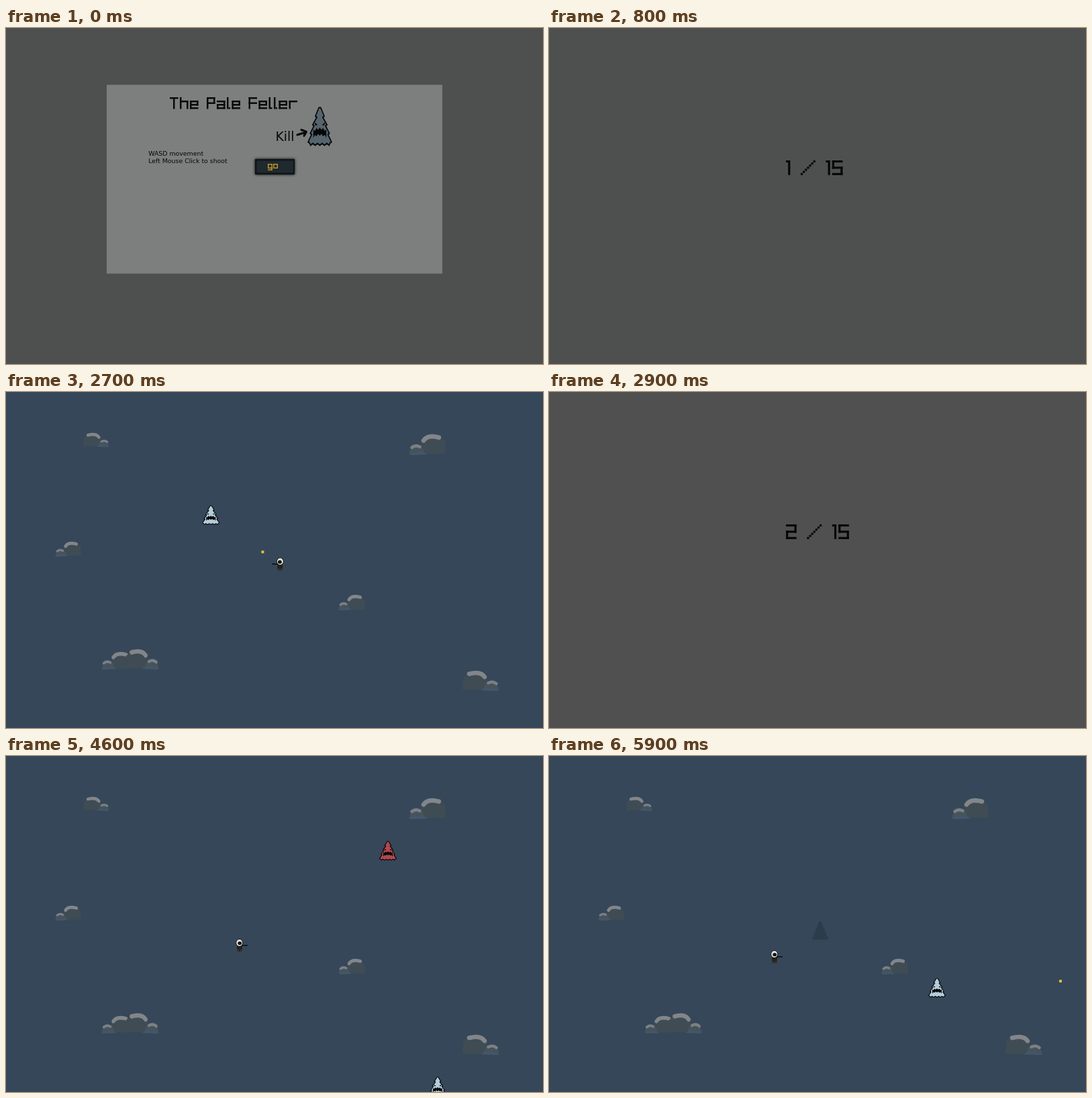
These frames come from a looping animation (800x500 px, 6 s). An HTML page with a canvas:

```html
<!DOCTYPE html>
<html lang="en">
<head>
<meta charset="utf-8">
<title>The Pale Feller</title>
<style>
html, body { margin: 0; width: 100%; height: 100%; overflow: hidden; background: #4d504f; }
canvas { display: block; }
</style>
</head>
<body>
<canvas id="stage" width="800" height="500"></canvas>
<script>
const ctx = document.getElementById('stage').getContext('2d');
const LOOP = 6000, TICK = 100;

function rect(x, y, w, h, color) {
  ctx.fillStyle = color;
  ctx.fillRect(x, y, w, h);
}

function disc(x, y, rx, ry, color) {
  ctx.fillStyle = color;
  ctx.beginPath();
  ctx.ellipse(x, y, rx, ry, 0, 0, Math.PI * 2);
  ctx.fill();
}

function shape(points, color) {
  ctx.beginPath();
  points.forEach(([x, y]) => ctx.lineTo(x, y));
  ctx.closePath();
  ctx.fillStyle = color;
  ctx.fill();
}

function brush(color, width) {
  ctx.strokeStyle = color;
  ctx.lineWidth = width;
  ctx.lineCap = ctx.lineJoin = 'round';
}

function label(text, x, y, size) {
  ctx.font = size + 'px "DejaVu Sans", sans-serif';
  ctx.fillStyle = '#080808';
  ctx.fillText(text, x, y);
}

// Pixel lettering: letters are built from named bars on a 5 by 7 grid.
const row = y => [0, y, 5, 1];
const col = (x, top, bottom) => [x, top, 1, bottom - top + 1];
const BARS = {
  a: row(0), x: row(2), m: row(3), c: row(4), b: row(6), d: row(8),
  L: col(0, 0, 6), l: col(0, 2, 6), u: col(0, 0, 3), k: col(0, 3, 6), n: col(0, 4, 6),
  r: col(4, 2, 6), v: col(4, 2, 4), w: col(4, 0, 3), z: col(4, 3, 6), q: col(4, 2, 8),
  s: col(2, 0, 6), p: col(1, 0, 6), i: col(0, 0, 0), f: col(1, 6, 6)
};
const LETTERS = {
  T: 'as', h: 'Lxr', e: 'xlbvc', P: 'aLwm', a: 'xrcnb', l: 'Lf', F: 'aLm', r: 'lx',
  g: 'xlbqd', o: 'xlbr', 1: 'ip', 2: 'awmkb', 5: 'aumzb'
};

function barsOf(ch) {
  if (ch === ' ') return [[0, 0, 3, 0]];
  if (ch === '/') return Array.from({ length: 7 }, (_, i) => [i, 6 - i, 1, 1]);
  return [...LETTERS[ch]].map(name => BARS[name]);
}

function pixelText(text, x, y, px, color) {
  for (const ch of text) {
    const bars = barsOf(ch);
    for (const [bx, by, w, h] of bars) rect(x + bx * px, y + by * px, w * px, h * px, color);
    x += (Math.max(...bars.map(b => b[0] + b[2])) + 1) * px;
  }
}

// Position along keys [time, x, y].
function along(keys, t) {
  let i = 0;
  while (i < keys.length - 2 && t >= keys[i + 1][0]) i++;
  const [t0, x0, y0] = keys[i], [t1, x1, y1] = keys[i + 1];
  const k = Math.max(0, Math.min(1, (t - t0) / (t1 - t0)));
  return [x0 + (x1 - x0) * k, y0 + (y1 - y0) * k];
}

// Tree outline in a 26 by 28 box: four widening tiers over a ragged hem.
function treeOutline() {
  const half = [[1, 0]];
  for (let i = 1; i <= 4; i++) {
    const x = 12.6 * (i / 4) ** .7, y = i * 6.4;
    half.push([x, y], [x - 1.6, y + .7]);
  }
  for (let i = 0; i <= 4; i++) half.push([10 - 2.5 * i, i % 2 ? 26.6 : 28]);
  return half.concat(half.slice().reverse().map(([x, y]) => [-x, y]));
}

// One row of teeth, bent down at the corners.
function teeth(y, bite) {
  return Array.from({ length: 9 }, (_, i) => {
    const x = (i - 4) * 1.75;
    return [x, y + (i % 2) * bite + .03 * x * x];
  });
}

const TREE = treeOutline();
const MOUTH = teeth(14.8, 1.6).concat(teeth(21, -1.6).reverse());

function monster(x, y, color, w = 26, h = 28) {
  ctx.save();
  ctx.translate(x, y - h / 2);
  ctx.scale(w / 26, h / 28);
  shape(TREE, color);
  brush('#050708', 1.1);
  ctx.stroke();
  shape(MOUTH, '#050708');
  for (const s of [-1, 1]) shape([[s * 6, 10.6], [s * 2.4, 12.8], [s * 4.6, 13.4]], '#050708');
  ctx.restore();
}

function corpse(x, y) {
  ctx.save();
  ctx.translate(x, y - 14);
  shape(TREE, '#2d3c4b');
  ctx.restore();
}

function snow(x0, y0, cx, cy, x1, y1, width, color) {
  brush(color, width);
  ctx.beginPath();
  ctx.moveTo(x0, y0);
  ctx.quadraticCurveTo(cx, cy, x1, y1);
  ctx.stroke();
}

function rock(x, y, w, h, flip) {
  ctx.save();
  ctx.translate(flip ? x + w : x, y);
  ctx.scale((flip ? -w : w) / 55, h / 30);
  shape([[0, 28], [1, 10], [8, 4], [29, 4], [37, 12], [38, 28]], '#3f4c54');
  shape([[31, 28], [34, 19], [39, 16], [49, 16], [54, 25], [54, 29]], '#47535b');
  shape([[27, 29], [34, 25], [46, 26], [55, 28], [52, 30]], '#43576b');
  snow(10, 4.5, 27, 0, 33, 9, 6.5, '#82868a');
  snow(38.5, 18, 45, 14.5, 50.5, 19, 4.5, '#7a8085');
  ctx.restore();
}

function field() {
  rect(0, 0, 800, 500, '#364759');
  rock(115, 61, 39, 21);
  rock(600, 63, 55, 31, true);
  rock(73, 223, 39, 22, true);
  rock(495, 302, 40, 23, true);
  rock(142, 387, 45, 26, true);
  rock(178, 383, 50, 30);
  rock(680, 415, 55, 30);
}

// dir: 0 = back view, 1 or -1 = aiming to that side
function player(x, y, dir) {
  ctx.save();
  ctx.translate(x, y);
  if (dir) {
    ctx.scale(dir, 1);
    rect(-4, 1, 8, 8, '#25231f');
    for (const leg of [-4, 1]) rect(leg, 6, 3, 3.5, '#3a362e');
    rect(2, -1, 10, 1.6, '#101010');
    disc(-.3, -4, 5.2, 5.8, '#0b0b0b');
    disc(-.3, -4, 4.5, 5, '#e4e4e0');
    disc(.2, -3.4, 2.9, 2.7, '#171513');
  } else {
    rect(-5.5, 0, 11, 9, '#171613');
    for (const side of [-4, .8]) {
      rect(side, 2, 3.4, 3, '#39352d');
      rect(side, 6, 3.4, 2.5, '#39352d');
    }
    disc(0, -2.8, 6, 5.7, '#141311');
    disc(0, -3, 5.4, 5, '#e2e2de');
    disc(0, -1.6, 4.5, 4.6, '#403831');
  }
  ctx.restore();
}

function bullet([x, y]) {
  rect(x - 2, y - 2, 4, 4, '#d9bd38');
}

// The hero hits the first foe once per period; each bullet takes FLIGHT ms.
const PERIOD = 350, FLIGHT = 200;
const WAVES = [
  {
    start: 1800, dies: 2900, dir: -1,
    hero: [[1800, 391, 241], [2800, 410, 258]],
    foes: [[[1800, 104, 49], [2900, 350, 213]]]
  },
  {
    start: 3900, dies: 5300, dir: 1,
    hero: [[3900, 391, 241], [4600, 348, 282], [5200, 283, 292], [5900, 336, 299]],
    foes: [
      [[3900, 746, 27], [4600, 569, 141], [5300, 404, 260]],
      [[3900, 706, 453], [4600, 643, 492], [5200, 640, 363], [5900, 578, 345]]
    ],
    stray: [[5400, 312, 296], [5900, 762, 335]]
  }
];

function wave({ start, dies, dir, hero, foes, stray }, t) {
  const age = t - start, phase = age % PERIOD;
  const [prey, ...others] = foes;
  const spot = along(prey, t), self = along(hero, t);
  field();
  if (t >= dies) corpse(...spot);
  else monster(...spot, age >= PERIOD && phase < TICK ? '#b3474e' : '#b4cddb');
  for (const path of others) monster(...along(path, t), '#b4cddb');

  const left = PERIOD - phase;
  if (t < dies && left < FLIGHT) {
    bullet(along([[0, ...self], [FLIGHT, ...spot]], FLIGHT - left));
  }
  if (stray && t >= stray[0][0]) bullet(along(stray, t));
  player(...self, age < FLIGHT ? 0 : dir);
}

function button(hover) {
  ctx.save();
  ctx.shadowColor = '#000';
  ctx.shadowBlur = 4;
  rect(371, 195, 59, 23, '#101416');
  ctx.restore();
  rect(373.5, 197.5, 54.5, 18, hover ? '#34434d' : '#1f292f');
  pixelText('go', 390, 199.5, 1.36, hover ? '#e6bc3a' : '#c59d2b');
}

function arrow() {
  brush('#080808', 3);
  ctx.beginPath();
  ctx.moveTo(434, 159);
  ctx.lineTo(447, 155);
  ctx.moveTo(440, 151.5);
  ctx.lineTo(447.5, 154.5);
  ctx.lineTo(444, 160.5);
  ctx.stroke();
}

function menu(hover) {
  rect(0, 0, 800, 500, '#4d504f');
  rect(150, 84.5, 500, 281, '#7c7f7e');
  pixelText('The Pale Feller', 244, 103, 2.5, '#0a0a0a');
  label('Kill', 401.5, 168, 18.75);
  label('WASD movement', 212.2, 190, 9.375);
  label('Left Mouse Click to shoot', 212.2, 201, 9.375);
  arrow();
  monster(467.5, 146.5, '#56646d', 36, 56);
  button(hover);
}

function counter(n, color) {
  rect(0, 0, 800, 500, color);
  pixelText(n + ' / 15', 353.1, 197, 3.125, '#060606');
}

function draw(t) {
  if (t < 800) menu(t >= 500);
  else if (t < 1800) counter(1, '#4d504f');
  else if (t < 2900) wave(WAVES[0], t);
  else if (t < 3900) counter(2, '#505051');
  else wave(WAVES[1], t);
}

const begin = performance.now();
function tick() {
  const t = (performance.now() - begin) % LOOP;
  draw(Math.floor(t / TICK) * TICK);
  requestAnimationFrame(tick);
}
tick();
</script>
</body>
</html>
```
